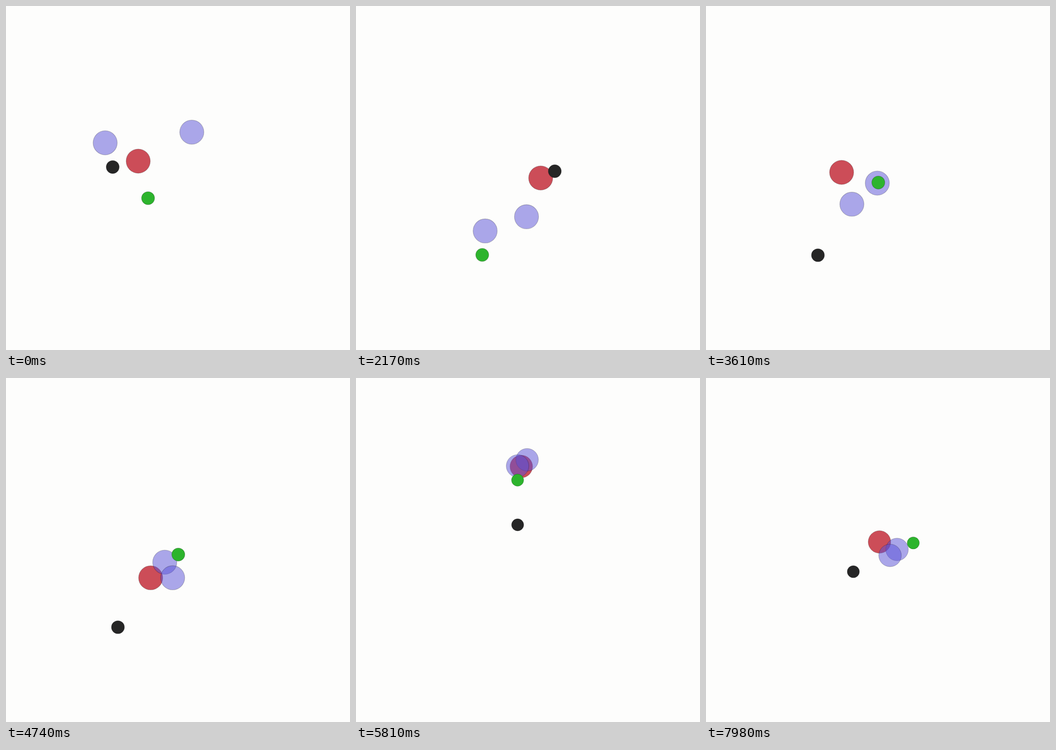
Animation of 704x704 px, one loop 8000 ms. Source, as an HTML page with a canvas:

```html
<!DOCTYPE html>
<html lang="en">
<head>
<meta charset="utf-8">
<title>Three agents, two landmarks</title>
<style>
html, body { margin: 0; width: 100%; height: 100%; overflow: hidden; background: #fdfdfc; }
canvas { display: block; width: 100vmin; height: 100vmin; }
</style>
</head>
<body>
<canvas id="stage" width="704" height="704"></canvas>
<script>
const ctx = document.getElementById('stage').getContext('2d');
const SIZE = 704, LOOP = 8000, STEPS_PER_SECOND = 30;
const EPISODE_STEPS = 50, FIRST_STEP = 3, SETTLE_STEPS = 36;
const AGENT = 23.1, LANDMARK = AGENT * 0.54;

// Points are measured from the centre of the stage.
const point = (x, y) => ({ x, y });
const move = (x, y, goalX, goalY) => ({ from: point(x, y), to: point(goalX, goalY) });

const episodes = [
  {
    black: point(-125, -21), green: point(-57.3, 38.6),
    red: move(-76.5, -36.2, -70.9, 34),
    blues: [move(-143.2, -73, -75.4, 29.5), move(29.2, -95, -20.9, 35.5)]
  },
  {
    black: point(51.3, -13), green: point(-87.6, 147.2),
    red: move(41.6, -96.7, 19.6, 26.2),
    blues: [move(-74, -125.7, -84.2, 162.8), move(28, -11.2, -11.2, 97.3)]
  },
  {
    black: point(-115, 147.8), green: point(0.6, 8.7),
    red: move(-83.5, -61.7, -53.3, 49.6),
    blues: [move(17.8, -1, -24, 22.6), move(-81.7, 47.7, -12.5, 53)]
  },
  {
    black: point(-21.2, -51.5), green: point(-21.3, -143),
    red: move(-91, 82, -14, -170),
    blues: [move(126, 18, -1.4, -184), move(-52, -22, -21.5, -171.5)]
  },
  {
    black: point(-50.5, 44.4), green: point(72.2, -14.4),
    red: move(23, 63, 3.8, -13.4),
    blues: [move(73, 68, 40.3, 1.6), move(13, -47, 24.2, 8.8)]
  }
];

// Damped spring: starts at rest, slightly overshoots, settles at 1.
function spring(u) {
  const damping = 3, swing = Math.PI * u;
  return 1 - Math.exp(-damping * u) * (Math.cos(swing) + damping / Math.PI * Math.sin(swing));
}

const between = ({ from, to }, f) =>
  point(from.x + (to.x - from.x) * f, from.y + (to.y - from.y) * f);

// The camera backs off once, when an agent nears the edge of its view.
const zoomAt = step => 1 + 0.069 * Math.min(1, Math.max(0, (166 - step) / 5));

function disc({ x, y }, radius, fill, alpha = 1) {
  ctx.beginPath();
  ctx.arc(x, y, radius, 0, 2 * Math.PI);
  ctx.globalAlpha = alpha;
  ctx.fillStyle = fill;
  ctx.fill();
  ctx.globalAlpha = 0.25;
  ctx.stroke();
  ctx.globalAlpha = 1;
}

function draw(time) {
  const step = Math.floor(time % LOOP * STEPS_PER_SECOND / 1000 + 0.01);
  const age = step + FIRST_STEP;
  const scene = episodes[Math.floor(age / EPISODE_STEPS)];
  const progress = spring(age % EPISODE_STEPS / SETTLE_STEPS);
  const zoom = zoomAt(step);

  ctx.setTransform(1, 0, 0, 1, 0, 0);
  ctx.fillStyle = '#fdfdfc';
  ctx.fillRect(0, 0, SIZE, SIZE);
  ctx.setTransform(zoom, 0, 0, zoom, SIZE / 2, SIZE / 2);

  disc(between(scene.red, progress), AGENT, '#cc4d58');
  for (const blue of scene.blues) disc(between(blue, progress), AGENT, '#5951d8', 0.5);
  disc(scene.black, LANDMARK, '#262626');
  disc(scene.green, LANDMARK, '#2db42d');
}

const start = performance.now();
function tick() {
  draw(performance.now() - start);
  requestAnimationFrame(tick);
}
tick();
</script>
</body>
</html>
```
